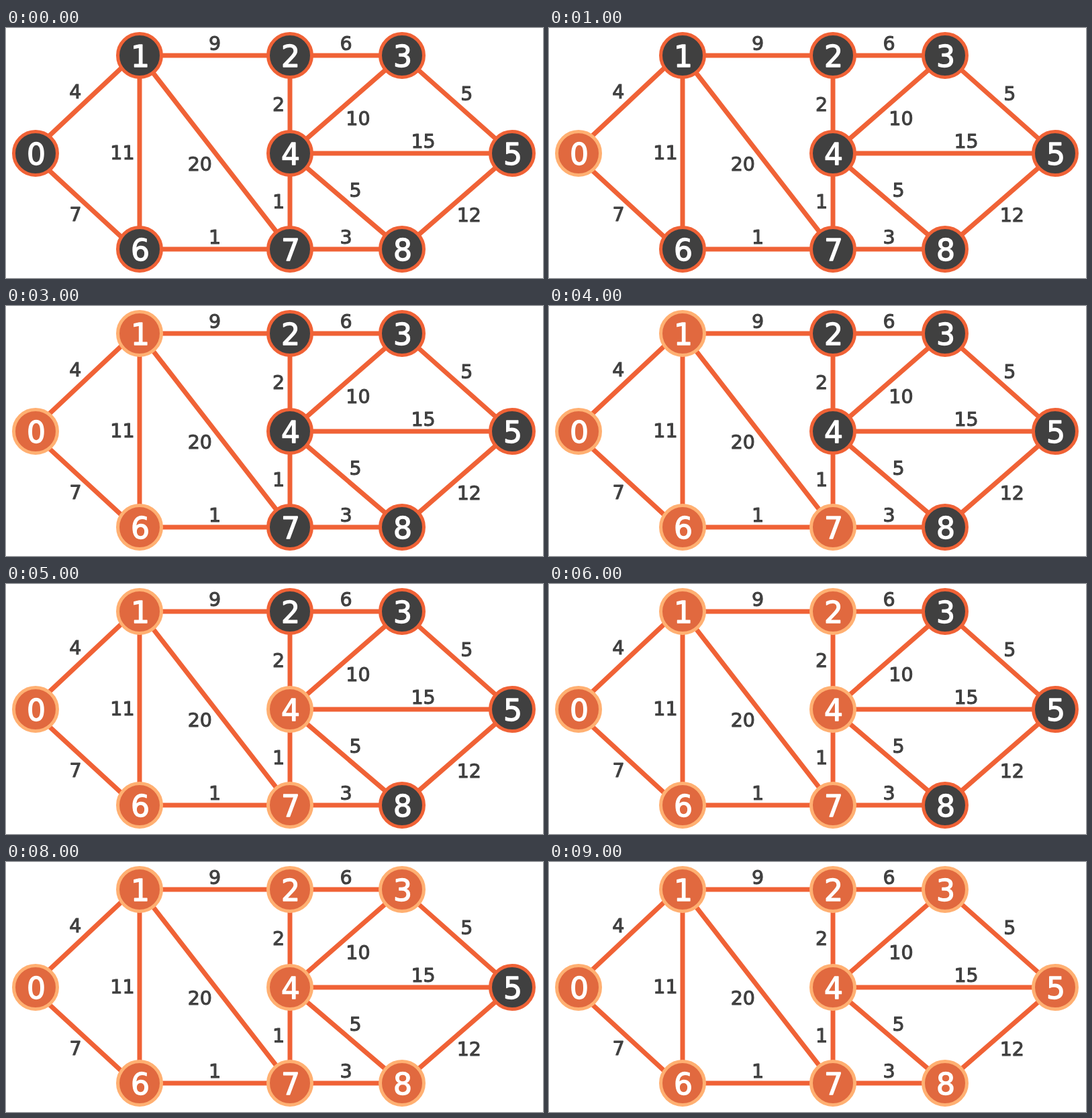
These frames come from a looping animation (800x373 px, 10 s). An HTML page:

```html
<!DOCTYPE html>
<html lang="en">
<head>
<meta charset="utf-8">
<title>Shortest path graph</title>
<style>
  html, body { margin: 0; width: 100%; height: 100%; overflow: hidden; background: #fff; }
  svg { display: block; width: 100%; height: 100%; }
  line { stroke: #f06236; stroke-width: 7; }
  circle { stroke-width: 5; }
  text { font-family: "DejaVu Sans", sans-serif; text-anchor: middle; stroke-linejoin: round; }
  .digit { font-size: 44px; fill: #fff; stroke: #fff; stroke-width: 1.4; }
  .weight { font-size: 28.5px; fill: #404040; stroke: #404040; stroke-width: 1.1; }
</style>
</head>
<body>
<svg viewBox="0 0 800 373"></svg>
<script>
const STEP = 1000, LOOP = 10 * STEP;
const svg = document.querySelector("svg");

// Each node sits on a lettered column and a numbered row.
const columns = { A: 44, B: 199, C: 423, D: 590, E: 754 };
const rows = [41, 187, 330];
const nodes = "A1 B0 C0 D0 C1 E1 B2 C2 D2".split(" ")
  .map(([column, row]) => ({ x: columns[column], y: rows[row] }));

// "from-to:weight"; the weight is written on the left of the direction of travel.
const edges = ("0-1:4 6-0:7 1-2:9 6-1:11 7-1:20 2-3:6 4-2:2 3-4:10 " +
  "3-5:5 4-5:15 4-8:5 5-8:12 6-7:1 7-4:1 7-8:3").split(" ").map(spec => {
  const [from, to, weight] = spec.split(/[-:]/).map(Number);
  return { from, to, weight };
});

function add(tag, attrs, text = "") {
  const el = document.createElementNS("http://www.w3.org/2000/svg", tag);
  for (const key in attrs) el.setAttribute(key, attrs[key]);
  el.textContent = text;
  return svg.appendChild(el);
}

function drawEdge({ from, to, weight }) {
  const a = nodes[from], b = nodes[to];
  const dx = b.x - a.x, dy = b.y - a.y, length = Math.hypot(dx, dy);
  const nx = dy / length, ny = -dx / length;

  // Edges of the start node run a little outside the centres.
  const shift = from * to === 0 ? 5 : 0;
  add("line", {
    x1: a.x + nx * shift, y1: a.y + ny * shift,
    x2: b.x + nx * shift, y2: b.y + ny * shift
  });

  // The gap grows with the label's extent across the edge.
  const halfWidth = 8.5 * String(weight).length, halfHeight = 10;
  const gap = shift + 8.5 + Math.abs(nx) * halfWidth + Math.abs(ny) * halfHeight;
  const along = length > 300 && dy === 0 ? 0.6 : 0.5;
  add("text", {
    x: a.x + dx * along + nx * gap,
    y: a.y + dy * along + ny * gap + 10.4,
    class: "weight"
  }, weight);
}

// Dijkstra's algorithm: the order in which nodes are settled.
function visitOrder(start) {
  const distance = nodes.map((_, i) => i === start ? 0 : Infinity);
  const open = new Set(nodes.keys()), order = [];
  while (open.size) {
    const current = [...open].reduce((best, i) => distance[i] < distance[best] ? i : best);
    open.delete(current);
    order.push(current);
    for (const { from, to, weight } of edges) {
      if (from !== current && to !== current) continue;
      const next = from === current ? to : from;
      distance[next] = Math.min(distance[next], distance[current] + weight);
    }
  }
  return order;
}

const idle = { fill: "#404040", stroke: "#f06236" };
const visited = { fill: "#e1693f", stroke: "#ffb072" };
const order = visitOrder(0);

edges.forEach(drawEdge);
nodes.forEach(({ x, y }, i) => {
  const disc = add("circle", { cx: x, cy: y, r: 32.5 });
  add("text", { x: x + 1, y: y + 17, class: "digit" }, i);
  const start = (order.indexOf(i) + 1) * STEP;
  disc.animate([
    { ...idle, offset: 0, easing: "step-end" },
    { ...visited, offset: start / LOOP, easing: "step-end" },
    { ...visited, offset: 1 }
  ], { duration: LOOP, iterations: Infinity });
});
</script>
</body>
</html>
```
